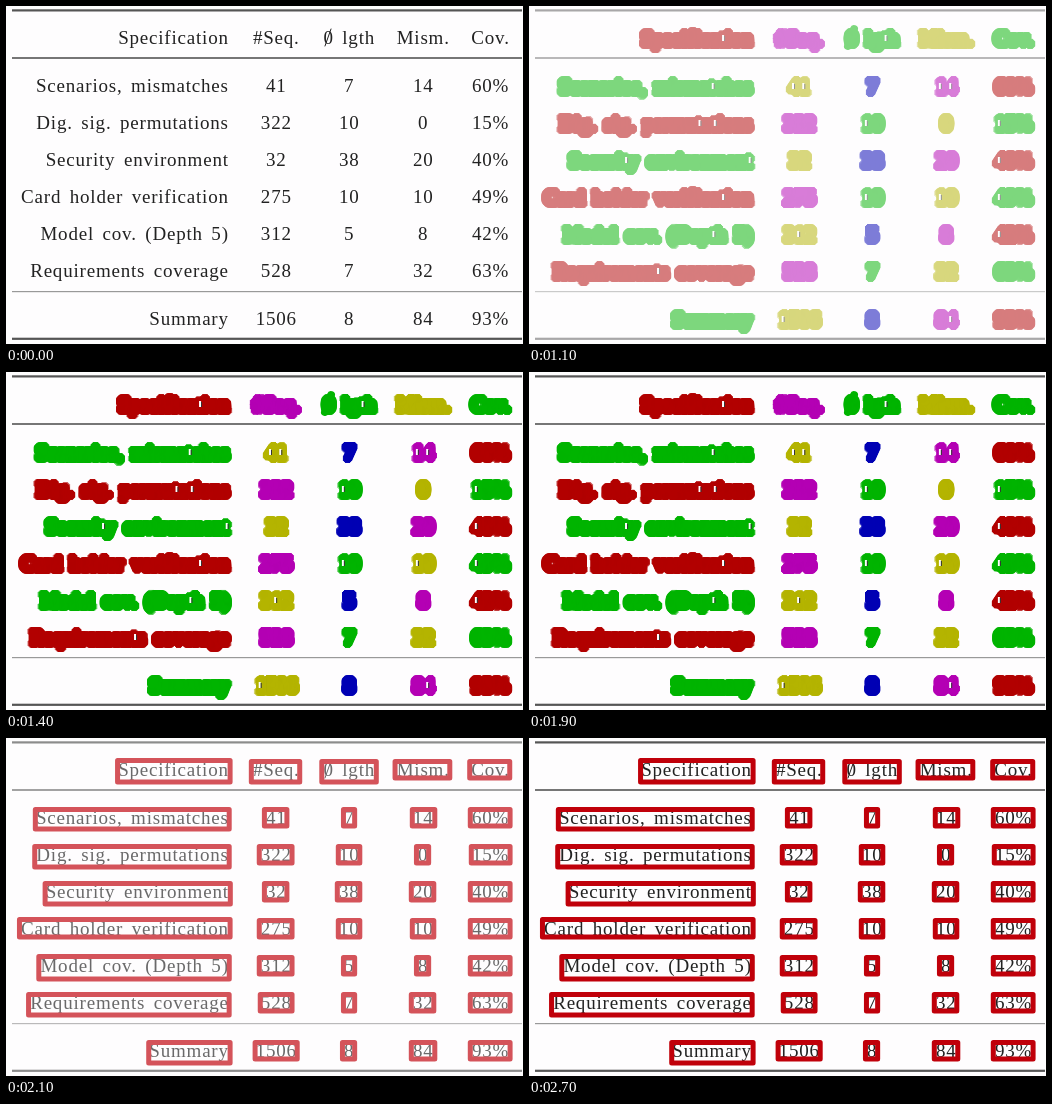
These frames come from a looping animation (517x338 px, 2.8 s). An HTML page with a canvas:

```html
<!DOCTYPE html>
<html lang="en">
<head>
<meta charset="utf-8">
<title>Table text detection</title>
<style>
  html, body { margin: 0; width: 100%; height: 100%; overflow: hidden; background: #fefdfe; }
  canvas { display: block; }
</style>
</head>
<body>
<canvas id="stage" width="517" height="338"></canvas>
<script>
const canvas = document.getElementById('stage');
const ctx = canvas.getContext('2d');

const table = `Specification|#Seq.|0 lgth|Mism.|Cov.
Scenarios, mismatches|41|7|14|60%
Dig. sig. permutations|322|10|0|15%
Security environment|32|38|20|40%
Card holder verification|275|10|10|49%
Model cov. (Depth 5)|312|5|8|42%
Requirements coverage|528|7|32|63%
Summary|1506|8|84|93%`.split('\n').map(line => line.split('|'));

const lastRow = table.length - 1;
const columnX = [222.8, 270.3, 343.2, 417.2, 484.5];
// Rows are evenly spaced, with extra room after the heading and before the summary
const baseline = r => 38 + 37 * r + 11 * ((r > 0) + (r === lastRow));

const [red, green, blue, magenta, yellow] = ['#b20000', '#00b400', '#0000b4', '#b400b4', '#b4b400'];
const palettes = [
  [red, magenta, green, yellow, green],
  [green, yellow, blue, magenta, red],
];

ctx.font = '19px "Liberation Serif", "Times New Roman", serif';
ctx.letterSpacing = '0.8px';
ctx.wordSpacing = '3px';
ctx.lineJoin = ctx.lineCap = 'round';

function eachCell(draw) {
  table.forEach((row, r) => row.forEach((text, c) => {
    ctx.textAlign = c ? 'center' : 'right';
    draw(text, columnX[c], baseline(r), palettes[r % 2][c]);
  }));
}

function drawRule(y, height, color) {
  ctx.fillStyle = color;
  ctx.fillRect(6, y - height / 2, 510, height);
}

function drawRules() {
  drawRule(4.4, 2.2, '#555');
  drawRule(52, 1.6, '#555');
  drawRule(285.6, 1.2, '#999');
  drawRule(332.8, 2.2, '#555');
}

// Turns the zero of the heading into an empty-set sign
function slash(width, color) {
  ctx.lineWidth = width;
  ctx.strokeStyle = color;
  ctx.beginPath();
  ctx.moveTo(319, 40);
  ctx.lineTo(325, 23);
  ctx.stroke();
}

function drawText() {
  ctx.fillStyle = '#222';
  eachCell((text, x, y) => ctx.fillText(text, x, y));
  slash(1, '#222');
}

// Small openings left in the blobs around upright letters
function drawGaps(text, x, y) {
  const left = x - ctx.measureText(text).width / (ctx.textAlign === 'center' ? 2 : 1);
  for (const { index } of text.matchAll(/[14t]/g)) {
    const gapX = left + ctx.measureText(text.slice(0, index)).width + 3;
    ctx.fillStyle = '#fefdfe';
    ctx.fillRect(gapX, y - 9, 2, 6);
    ctx.fillStyle = '#333';
    ctx.fillRect(gapX + 2, y - 8, 1, 5);
  }
}

function drawBlobs() {
  slash(8, green);
  eachCell((text, x, y, color) => {
    ctx.fillStyle = color;
    for (let dx = -4; dx <= 4; dx++) {
      for (let dy = -4; dy <= 4; dy++) {
        if (Math.abs(dx) + Math.abs(dy) <= 6) ctx.fillText(text, x + dx + 0.5, y + dy + 0.5);
      }
    }
    drawGaps(text, x, y);
  });
}

function drawBoxes() {
  drawText();
  ctx.lineWidth = 5;
  ctx.strokeStyle = '#c0000a';
  const pad = 1.6;
  eachCell((text, x, y) => {
    const m = ctx.measureText(text);
    const left = x - m.actualBoundingBoxLeft - pad;
    const top = y - m.actualBoundingBoxAscent - pad;
    ctx.strokeRect(left, top,
      x + m.actualBoundingBoxRight + pad - left,
      y + m.actualBoundingBoxDescent + pad + 0.5 - top);
  });
}

const scenes = [
  { start: 0, draw: drawText },
  { start: 1000, draw: drawBlobs, fadeFrom: 955 },
  { start: 2000, draw: drawBoxes, fadeFrom: 1908 },
];
const LOOP = 2800, TICK = 100, FADE = 286;
let shown;

function frame(now) {
  const t = Math.floor(now % LOOP / TICK) * TICK;
  const scene = scenes.findLast(s => t >= s.start);
  if (scene !== shown) {
    ctx.clearRect(0, 0, canvas.width, canvas.height);
    drawRules();
    scene.draw();
    shown = scene;
  }
  // Each new scene fades in from the empty page
  canvas.style.opacity = scene.fadeFrom ? Math.min(1, (t - scene.fadeFrom) / FADE) : 1;
  requestAnimationFrame(frame);
}
frame(performance.now());
</script>
</body>
</html>
```
